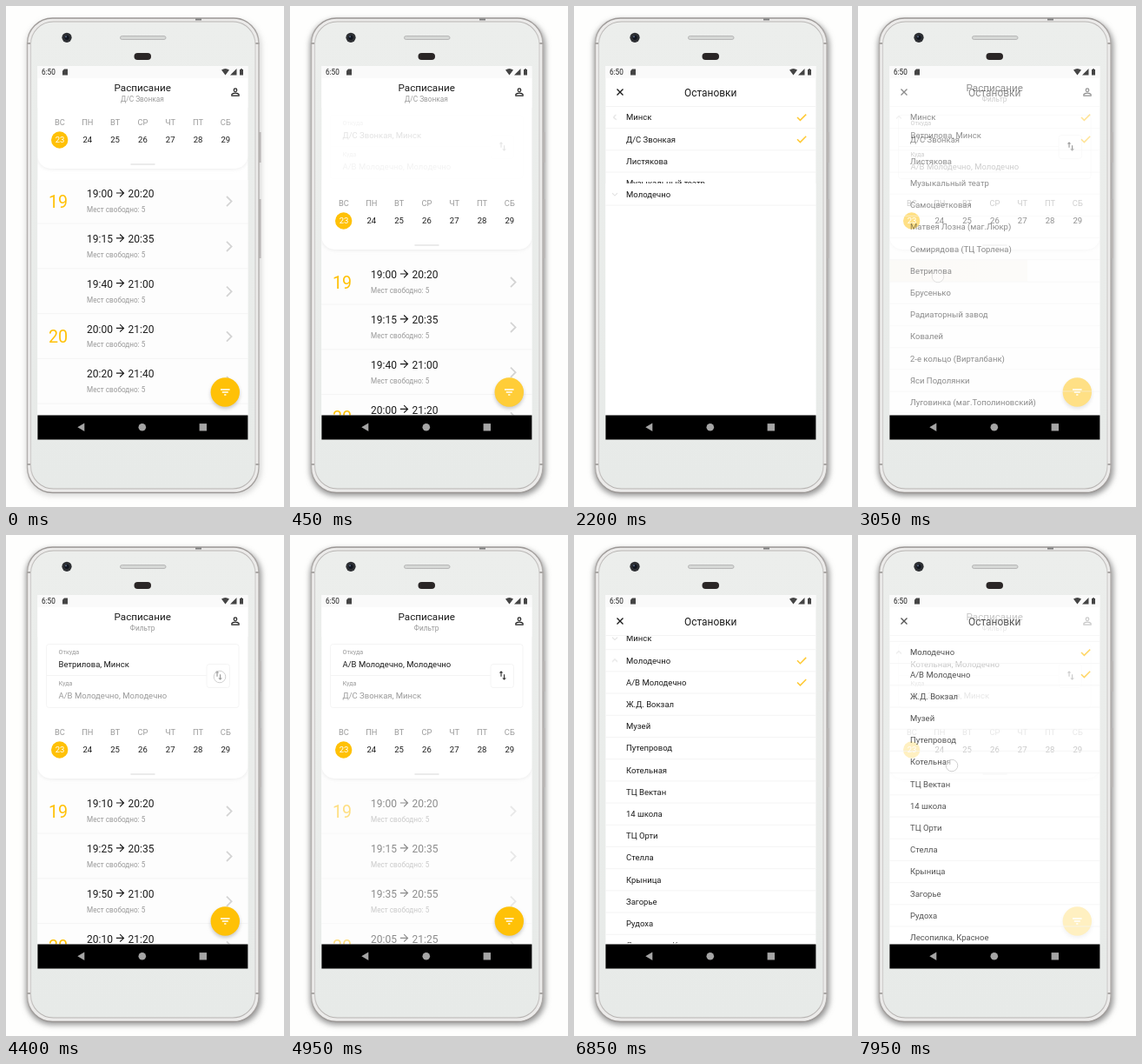
Write an HTML page that moves like this. It is 320 px wide and 576 px high and loops after 8 s.

```html
<!DOCTYPE html>
<html lang="ru">
<head>
<meta charset="utf-8">
<title>Расписание</title>
<style>
html, body { margin: 0; width: 100%; height: 100%; overflow: hidden; background: #fefefd; }
svg { display: block; width: 100vw; height: 100vh; }
text { font-family: Roboto, "Open Sans", sans-serif; fill: #1c1c1c; }
.grey { fill: #9a9a9a; }
.amber { fill: #ffc107; }
.line { stroke: #f4f4f4; stroke-width: 1; fill: none; }
.chev { fill: none; stroke: #d4d4d4; stroke-width: 1.8; }
.fold { fill: none; stroke: #e2e2e2; stroke-width: 1.1; }
.check { fill: none; stroke: #ffc933; stroke-width: 1.5; }

/* one timeline of 8 s: 1% = 80 ms */
.a { animation: 8s linear infinite both; }
.step { animation-timing-function: step-end; }

.shade { animation-name: shade; }
@keyframes shade { 0% { opacity: .35 } 1.875%, 100% { opacity: 1 } }

.plan { animation-name: plan; }
@keyframes plan {
  0%, 14.25% { opacity: 1 } 17.06%, 36.75% { opacity: 0 }
  39.56%, 73.63% { opacity: 1 } 76.44%, 98.69% { opacity: 0 } 100% { opacity: .47 }
}
.stops { animation-name: stops; }
@keyframes stops {
  0%, 14.25% { opacity: 0 } 17.06%, 36.75% { opacity: 1 }
  39.56%, 73.63% { opacity: 0 } 76.44%, 98.69% { opacity: 1 } 100% { opacity: .53 }
}
.drop { animation-name: drop; }
@keyframes drop {
  0%, 1.875% { transform: translateY(-93px); animation-timing-function: cubic-bezier(.4, 0, .2, 1) }
  5.375%, 100% { transform: none }
}
.form { animation-name: form; }
@keyframes form { 0%, 5% { opacity: 0 } 10%, 100% { opacity: 1 } }
.place { animation-name: place; }
@keyframes place { 0%, 5.625% { opacity: 1 } 8.125%, 100% { opacity: 0 } }
.filter { animation-name: filter; }
@keyframes filter { 0%, 5.625% { opacity: 0 } 8.125%, 100% { opacity: 1 } }
.press { animation-name: press; }
@keyframes press { 0%, 1.875% { opacity: 0 } 3.1% { opacity: .25 } 5.7% { opacity: .2 } 9%, 100% { opacity: 0 } }
.field { animation-name: field; }
@keyframes field {
  0%, 13% { opacity: 0 } 14.3%, 17% { opacity: 1 } 18%, 71.875% { opacity: 0 }
  73.6%, 77% { opacity: 1 } 78%, 100% { opacity: 0 }
}

.tripsA { animation-name: tripsA; }
@keyframes tripsA { 0% { opacity: 1 } 31.25%, 100% { opacity: 0 } }
.tripsB { animation-name: tripsB; }
@keyframes tripsB { 0%, 40.625% { opacity: 0 } 43.5%, 55.625% { opacity: 1 } 58.125%, 100% { opacity: 0 } }
.tripsC { animation-name: tripsC; }
@keyframes tripsC { 0%, 60.625% { opacity: 0 } 63.125%, 87% { opacity: 1 } 87.5%, 100% { opacity: 0 } }

.from1 { animation-name: from1; }
@keyframes from1 { 0% { opacity: 1 } 31.25%, 100% { opacity: 0 } }
.from2 { animation-name: from2; }
@keyframes from2 { 0% { opacity: 0 } 31.25% { opacity: 1 } 57%, 100% { opacity: 0 } }
.from3 { animation-name: from3; }
@keyframes from3 { 0% { opacity: 0 } 57% { opacity: 1 } 93%, 100% { opacity: 0 } }
.from4 { animation-name: from4; }
@keyframes from4 { 0% { opacity: 0 } 93%, 100% { opacity: 1 } }
.to1 { animation-name: to1; }
@keyframes to1 { 0% { opacity: 1 } 57%, 100% { opacity: 0 } }
.to2 { animation-name: to2; }
@keyframes to2 { 0% { opacity: 0 } 57%, 100% { opacity: 1 } }

.list1 { animation-name: list1; }
@keyframes list1 { 0%, 16.75% { opacity: 0 } 19.75%, 50% { opacity: 1 } 50.1%, 100% { opacity: 0 } }
.list2 { animation-name: list2; }
@keyframes list2 { 0%, 76% { opacity: 0 } 78.75%, 100% { opacity: 1 } }
.open1 { animation-name: open1; }
@keyframes open1 {
  0%, 26.25% { transform: none; animation-timing-function: ease-in-out }
  30.5%, 100% { transform: translateY(345px) }
}
.open2 { animation-name: open2; }
@keyframes open2 {
  0%, 82.5% { transform: none; animation-timing-function: ease-in-out }
  86.5%, 100% { transform: translateY(345px) }
}
.scroll { animation-name: scroll; }
@keyframes scroll {
  0%, 84.4% { transform: none; animation-timing-function: ease-out }
  88.1%, 100% { transform: translateY(-18.2px) }
}
.flip1, .flip2 { transform-box: fill-box; transform-origin: center; }
.flip1 { animation-name: flip1; }
@keyframes flip1 { 0%, 26.25% { transform: none } 29%, 100% { transform: rotate(180deg) } }
.flip2 { animation-name: flip2; }
@keyframes flip2 { 0%, 82.5% { transform: none } 85.5%, 100% { transform: rotate(180deg) } }
.picked { animation-name: picked; }
@keyframes picked { 0%, 35.6% { opacity: 0 } 37%, 100% { opacity: 1 } }
.spin { animation-name: spin; }
@keyframes spin {
  0%, 73.6% { opacity: 0; stroke-dasharray: 0 70 } 73.7% { opacity: 1; stroke-dasharray: 1 70 }
  75% { opacity: 1; stroke-dasharray: 5 70 } 76.6% { opacity: 1; stroke-dasharray: 24 70 }
  77%, 100% { opacity: 0; stroke-dasharray: 30 70 }
}
.touch { animation-name: touch; }
@keyframes touch {
  0% { opacity: 0 }
  12.5% { opacity: 1; transform: translate(112.5px, 145.5px) } 15% { opacity: 0 }
  24.375% { opacity: 1; transform: translate(88px, 128.5px) } 26.875% { opacity: 0 }
  35.625% { opacity: 1; transform: translate(92px, 311px) }
  37.5% { opacity: .6; transform: translate(92px, 311px) } 38.75% { opacity: 0 }
  55% { opacity: 1; transform: translate(246px, 163px) } 57.5% { opacity: 0 }
  71.875% { opacity: 1; transform: translate(112px, 145px) } 73.75% { opacity: 0 }
  82.5% { opacity: 1; transform: translate(90px, 153px) } 84.375% { opacity: 0 }
  97.5%, 100% { opacity: 1; transform: translate(108px, 265px) }
}
</style>
</head>
<body>
<svg id="stage" viewBox="0 0 320 576" xmlns="http://www.w3.org/2000/svg"></svg>
<script>
const AMBER = '#ffc107';
const STEP = 25.2;

// y is the middle of the capitals
const text = (x, y, size, s, cls = '', anchor = 'start') =>
  `<text x="${x}" y="${(y + size * .355).toFixed(2)}" font-size="${size}" class="${cls}" text-anchor="${anchor}">${s}</text>`;
const mid = (x, y, size, s, cls) => text(x, y, size, s, cls, 'middle');
const group = (cls, ...parts) => `<g class="${cls}">${parts.join('')}</g>`;
const hline = (y, x1 = 36, x2 = 279) => `<path class="line" d="M${x1} ${y}H${x2}"/>`;
const icon = (x, y, d, fill = '#1c1c1c') =>
  `<path transform="translate(${x} ${y}) scale(.59) translate(-12 -12)" fill="${fill}" d="${d}"/>`;
const check = y => `<path class="check" d="M257 ${y}l3.4 3.4 6.8-6.8"/>`;

const ARROW = 'M12 4l-1.41 1.41L16.17 11H4v2h12.17l-5.58 5.59L12 20l8-8z';
const SWAP = 'M16 17.01V10h-2v7.01h-3L15 21l4-3.99h-3zM9 3L5 6.99h3V14h2V6.99h3L9 3z';
const PERSON = 'M12 5.9a2.1 2.1 0 1 1 0 4.2a2.1 2.1 0 0 1 0-4.2m0 9c2.97 0 6.1 1.46 6.1 2.1v1.1H5.9V17c0-.64 3.13-2.1 6.1-2.1M12 4a4 4 0 1 0 0 8a4 4 0 0 0 0-8zm0 9c-2.67 0-8 1.34-8 4v3h16v-3c0-2.66-5.33-4-8-4z';

function phone() {
  const band = y => `<path d="M24 ${y}h5M286.500 ${y}h5" stroke="#a9a6a4" stroke-width="2"/>`.replace('.500', '.5');
  const ends = (edge, side) => `<stop offset="0" stop-color="${edge}"/><stop offset=".05" stop-color="${side}"/>
    <stop offset=".94" stop-color="${side}"/><stop offset="1" stop-color="${edge}"/>`;
  return `
  <defs>
    <linearGradient id="edge" x2="0" y2="1">${ends('#9b9795', '#b3b0ae')}</linearGradient>
    <linearGradient id="lip" x2="0" y2="1">${ends('#b7b4b2', '#cfcdcc')}</linearGradient>
    <linearGradient id="face" x2="0" y2="1"><stop offset="0" stop-color="#eceeec"/><stop offset="1" stop-color="#e7eae8"/></linearGradient>
    <linearGradient id="tint"><stop offset="0" stop-color="#faf7f1"/><stop offset="1" stop-color="#fcfaf6"/></linearGradient>
    <filter id="blur" x="-20%" y="-20%" width="140%" height="140%"><feGaussianBlur stdDeviation="3"/></filter>
    <filter id="soft" x="-50%" y="-50%" width="200%" height="200%"><feGaussianBlur stdDeviation="2"/></filter>
    <clipPath id="view"><path d="M36.4 69h242v401.4h-242z"/></clipPath>
    <clipPath id="body"><path d="M36 116h243v355H36z"/></clipPath>
  </defs>
  <rect class="a step shade" x="23" y="16" width="271" height="547" rx="30" fill="#949494" filter="url(#blur)"/>
  <path d="M292 145v35M292 222v68" stroke="#b9b6b5" stroke-width="3"/>
  <rect x="24.5" y="14" width="266.500" height="545.500" rx="29" fill="#ecebea" stroke="url(#edge)" stroke-width="1.400"/>
  <path d="M218 15.500h7" stroke="#7d7d7d" stroke-width="2"/>
  ${band(43)}${band(527)}
  <rect x="28.500" y="18" width="258.500" height="537" rx="26" fill="url(#face)" stroke="url(#lip)" stroke-width="1.200"/>
  <circle cx="70" cy="36.300" r="5.600" fill="#2d2f33"/><circle cx="70" cy="36.300" r="2.600" fill="#11151f"/>
  <circle cx="69" cy="35.300" r="1" fill="#5b6a85"/>
  <rect x="131.500" y="34.500" width="52.500" height="4" rx="2" fill="#d6d8d6" stroke="#adadad" stroke-width=".8"/>
  <rect x="147.500" y="54" width="19.500" height="8" rx="4" fill="#2a2626"/>
  <path d="M36.400 69h242v429h-242z" fill="#fff"/>`.replace(/(\.\d)00/g, '$1');
}

function chrome() {
  return `<path d="M36.4 69h242v14h-242z" fill="#fafafa"/>${text(41, 76, 8.2, '6:50')}
  <path d="M67 72.5h4v7h-6v-5z" fill="#444"/>
  <path d="M248 73.5q4.5-3 9 0l-4.5 6zM265.5 72v7.5h-7.5zM269 73h1.2v-1h1.6v1h1.2v6.5h-4z" fill="#444"/>
  <path d="M36.4 470.4h242v28.2h-242z"/>
  <path d="M82.3 484.3l8-4.7v9.4z" fill="#a5a5a5"/>
  <circle cx="156.8" cy="484.3" r="4.3" fill="#a5a5a5"/>
  <path d="M222.6 480.1h8.4v8.4h-8.4z" fill="#a5a5a5"/>`;
}

function week() {
  return ['ВС', 'ПН', 'ВТ', 'СР', 'ЧТ', 'ПТ', 'СБ'].map((d, i) => {
    const x = 62 + i * 31.8;
    const day = mid(x, 247, 9.5, 23 + i);
    const today = `<circle cx="61.7" cy="247" r="9.7" fill="${AMBER}"/><g style="filter:invert(1) brightness(2)">${day}</g>`;
    return mid(x, 227, 9.3, d, 'grey') + (i ? day : today);
  }).join('');
}

function trips(cls, times) {
  const rows = times.map(([a, b], i) => {
    const y = 309 + i * 51.8;
    const hour = i % 3 ? '' : mid(60, y + 9, 19.7, i ? 20 : 19, 'amber');
    return hour + text(93, y, 12, a) + icon(131.6, y - 1, ARROW) + text(140.5, y, 12, b) +
      text(93, y + 18, 8.2, 'Мест свободно: 5', 'grey') +
      `<path class="chev" d="M254 ${y + 3}l5.6 5.6-5.6 5.6"/>` + hline(y + 34);
  });
  return group('a ' + cls, ...rows);
}

function form() {
  const value = (cls, y, s, tone) => group('a step ' + cls, text(60.5, y, 9.5, s, tone));
  return group('a form',
    '<rect x="46.5" y="125.5" width="221.5" height="73" rx="3" fill="#fff" stroke="#f4f4f4"/>',
    '<rect class="a field" x="48" y="126" width="220" height="35.5" fill="#faf8f1"/>',
    hline(161.5, 47, 231),
    text(60.5, 134, 7.2, 'Откуда', 'grey'),
    value('from1', 149, 'Д/С Звонкая, Минск'),
    value('from2', 149, 'Ветрилова, Минск'),
    value('from3', 149, 'А/В Молодечно, Молодечно'),
    value('from4', 149, 'Котельная, Молодечно'),
    text(60.5, 170.5, 7.2, 'Куда', 'grey'),
    value('to1', 185, 'А/В Молодечно, Молодечно', 'grey'),
    value('to2', 185, 'Д/С Звонкая, Минск', 'grey'),
    '<rect x="231" y="148.5" width="26.5" height="27" rx="3" fill="#fff" stroke="#f4f4f4"/>',
    icon(244.8, 161.5, SWAP, '#333'));
}

function plan() {
  return group('a plan',
    '<path d="M36 200h243v271H36z" fill="#fdfdfd"/>',
    group('a drop',
      trips('tripsA step', [['19:00', '20:20'], ['19:15', '20:35'], ['19:40', '21:00'], ['20:00', '21:20'], ['20:20', '21:40']]),
      trips('tripsB', [['19:10', '20:20'], ['19:25', '20:35'], ['19:50', '21:00'], ['20:10', '21:20']]),
      trips('tripsC', [['19:00', '20:20'], ['19:15', '20:35'], ['19:35', '20:55'], ['20:05', '21:25']]),
      '<rect x="36.4" y="60" width="242" height="220.5" rx="15" fill="#ddd" filter="url(#soft)" opacity=".6"/>',
      '<rect x="36.4" y="60" width="242" height="220" rx="15" fill="#fff"/>',
      week(), '<path d="M143.5 275h28" stroke="#e4e4e4" stroke-width="1.5"/>'),
    '<path d="M36 83h243v34H36z" fill="#fff"/>',
    mid(157.2, 94, 11.7, 'Расписание'),
    group('a place', mid(157, 107, 8.3, 'Д/С Звонкая', 'grey')),
    group('a filter', mid(157, 107, 8.3, 'Фильтр', 'grey')),
    icon(264, 99, PERSON),
    form(),
    '<circle cx="252.3" cy="446.5" r="16.5" fill="#999" opacity=".55" filter="url(#soft)"/>',
    `<circle cx="252.3" cy="444" r="16.7" fill="${AMBER}"/>`,
    '<circle class="a press" cx="252.3" cy="444" r="16.7" fill="#fff"/>',
    '<path d="M247 441h10.6M248.8 444h7M251.2 447h2.2" stroke="#fff" stroke-width="1.3"/>');
}

const row = (s, y, mark) => text(60, y, 9.5, s) + (mark ? check(y) : '') + hline(y + 12.6);
const head = (s, y, mark, flip = '') =>
  `<path class="fold a ${flip}" d="M44 ${y - 1.5}l3 3 3-3"/>` + row(s, y, mark);
const rows = (names, y) => names.map((s, i) => row(s, y + i * STEP, !i)).join('');
const cover = y => `<path d="M36 ${y}h243v420H36z" fill="#fff"/>`;

function stops() {
  const y1 = 128, y2 = y1 + STEP;
  const minsk = ['Д/С Звонкая', 'Листякова', 'Музыкальный театр', 'Самоцветковая', 'Матвея Лозна (маг.Люкр)',
    'Семирядова (ТЦ Торлена)', 'Ветрилова', 'Брусенько', 'Радиаторный завод', 'Ковалей',
    '2-е кольцо (Вирталбанк)', 'Яси Подолянки', 'Луговинка (маг.Тополиновский)'];
  const town = ['А/В Молодечно', 'Ж.Д. Вокзал', 'Музей', 'Путепровод', 'Котельная', 'ТЦ Вектан', '14 школа',
    'ТЦ Орти', 'Стелла', 'Крыница', 'Загорье', 'Рудоха', 'Лесопилка, Красное'];
  return group('a stops',
    '<path d="M49.5 95.5l7 7m0-7l-7 7" stroke="#1c1c1c" stroke-width="1.4"/>',
    mid(157.2, 99.5, 11.9, 'Остановки'), hline(115.5),
    `<path class="a spin" d="M157.5 283a10 10 0 1 1-.01 0" fill="none" stroke="${AMBER}" stroke-width="2.4"/>`,
    '<g clip-path="url(#body)">',
    group('a list1',
      '<rect class="a picked" x="36" y="291" width="159" height="26" fill="url(#tint)"/>',
      rows(minsk, y2),
      group('a open1', cover(y1 + 12.6), head('Молодечно', y2, false)),
      head('Минск', y1, true, 'flip1')),
    group('a list2', group('a scroll',
      head('Минск', y1, false),
      rows(town, y2 + STEP),
      group('a open2', cover(y2 + 12.6)),
      head('Молодечно', y2, true, 'flip2'))),
    '</g>');
}

document.getElementById('stage').innerHTML = phone() +
  `<g clip-path="url(#view)">${plan()}${stops()}</g>` + chrome() +
  '<circle class="a step touch" r="6.8" fill="#fff" fill-opacity=".5" stroke="#cfcfcf"/>';
</script>
</body>
</html>
```
